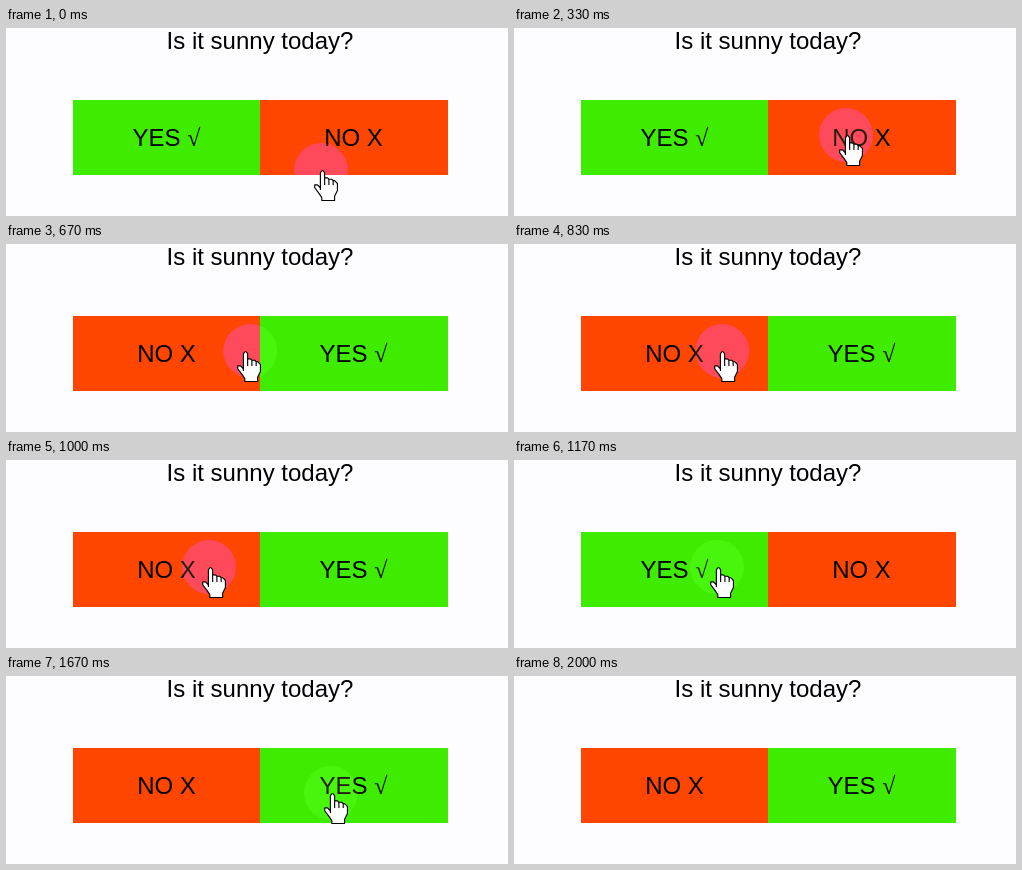
An HTML page that plays this animation: 502x188 px, repeating every 2910 ms.

```html
<!DOCTYPE html>
<html lang="en">
<head>
<meta charset="utf-8">
<title>Sunny or not</title>
<style>
  html, body { margin: 0; width: 100%; height: 100%; overflow: hidden; background: #fdfdff; }
  svg { display: block; }
  text { font: 24px "Liberation Sans", Arial, sans-serif; text-anchor: middle; fill: #000; }
  .root { font-family: "Liberation Serif", "Times New Roman", serif; }
  .yes { fill: #3fec00; }
  .no { fill: #ff4600; }
  .yes + .glow { fill: #28fe00; }
  .no + .glow { fill: #ff345d; }
  .sheen { fill: #ffc85a; opacity: .15; }
</style>
</head>
<body>
<svg width="502" height="188" viewBox="0 0 502 188">
  <text x="254" y="21">Is it sunny today?</text>
  <svg id="yes" y="72" height="75" overflow="hidden">
    <rect class="yes" width="188" height="75"/>
    <circle class="glow" r="27"/>
    <text x="93.5" y="46">YES <tspan class="root">√</tspan></text>
    <circle class="sheen" r="27"/>
  </svg>
  <svg id="no" y="72" height="75" overflow="hidden">
    <rect class="no" width="188" height="75"/>
    <circle class="glow" r="27"/>
    <text x="93.5" y="46">NO X</text>
    <circle class="sheen" r="27"/>
  </svg>
  <g id="hand" fill="#fff" stroke="#000" stroke-width=".8" stroke-linejoin="round">
    <path d="M4.5 12.5V2L5.5 .5H6.5L7.5 2V5.5H9.5L10.5 6.5H12.5L13.5 7.5H14.5L16.5 9.5V14.5L14.5 18.5V21.5H5.5V19.5L3.5 16.5L.5 12.5V10.5H2.5Z"/>
    <path fill="none" d="M4.5 12V14M7.5 5.5V10.5M10.5 6.5V10.5M13.5 7.5V10.5"/>
  </g>
</svg>
<script>
const LOOP = 2910, TICK = 1000 / 12;
const LEFT = 67, MIDDLE = 254, RIGHT = 442, TOP = 72;
const SWAPS = [6, 14, 20], GONE = 24;
const GLOW_LAG = 0.2;

const origin = { x: 308, y: 142 };
const moves = [
  { from: 0, to: 4, x: 325, y: 107 },
  { from: 6, to: 12, x: 196, y: 107 },
  { from: 14, to: 17, x: 318, y: 117 },
  { from: 21, to: 23, x: 321, y: 135 }
];

const easeOut = u => 1 - (1 - u) ** 3.2;
const mix = (a, b, u) => a + (b - a) * u;

const hand = document.getElementById("hand");
const buttons = ["yes", "no"].map(id => {
  const box = document.getElementById(id);
  return { box, circles: box.querySelectorAll("circle") };
});

function setAll(el, attrs) {
  for (const name in attrs) el.setAttribute(name, attrs[name]);
}

function handAt(tick) {
  return moves.reduce((p, m) => {
    const u = Math.min(1, Math.max(0, (tick - m.from) / (m.to - m.from)));
    return { x: mix(p.x, m.x, easeOut(u)), y: mix(p.y, m.y, easeOut(u)) };
  }, origin);
}

function draw(ms) {
  // the picture advances in whole ticks, rounded to 10 ms
  const tick = Math.floor((ms % LOOP + 4) / TICK);
  const swapped = SWAPS.filter(t => tick >= t).length % 2 === 1;
  const visibility = tick < GONE ? "visible" : "hidden";
  const { x, y } = handAt(tick);
  const glow = handAt(tick - GLOW_LAG);

  setAll(hand, {
    visibility,
    transform: `translate(${Math.round(x)} ${Math.round(y)}) scale(1.42)`
  });
  buttons.forEach(({ box, circles }, i) => {
    const onRight = (i === 0) === swapped;
    const left = onRight ? MIDDLE : LEFT;
    setAll(box, { x: left, width: (onRight ? RIGHT : MIDDLE) - left });
    circles.forEach(c => setAll(c, {
      visibility,
      cx: glow.x + 7 - left,
      cy: glow.y - TOP
    }));
  });
}

const start = performance.now();
function frame() {
  draw(performance.now() - start);
  requestAnimationFrame(frame);
}
draw(0);
requestAnimationFrame(frame);
</script>
</body>
</html>
```
